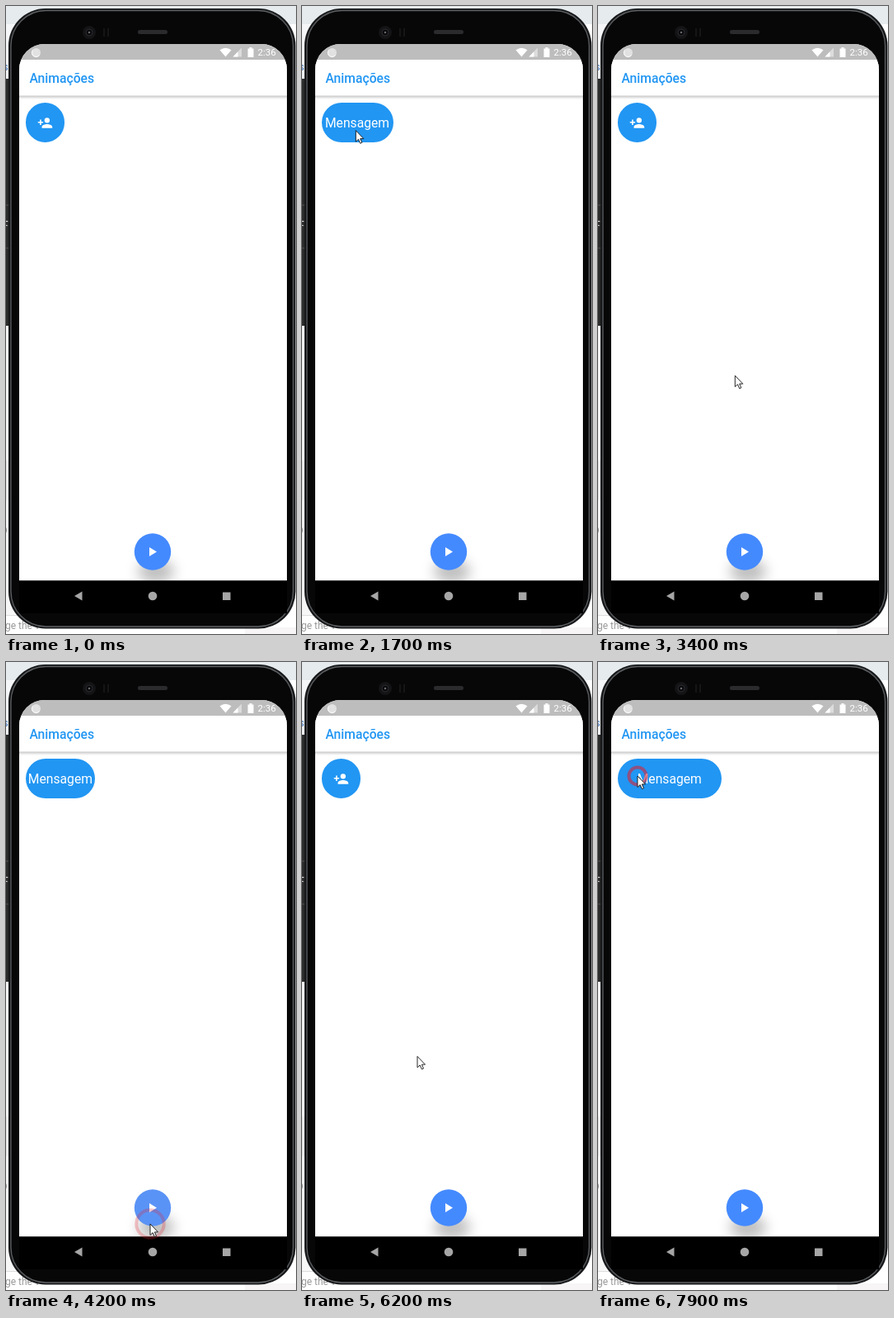
Write an HTML page that moves like this. It is 352x760 px and loops after 8 s.

```html
<!DOCTYPE html>
<html lang="pt">
<head>
<meta charset="utf-8">
<title>Animações</title>
<style>
html, body { margin: 0; width: 100%; height: 100%; overflow: hidden; background: #fff; }
#stage { position: relative; width: 352px; height: 760px; overflow: hidden; }
svg { position: absolute; left: 0; top: 0; }
text { font-family: Roboto, sans-serif; }
#button {
  position: absolute; left: 23.5px; top: 117px; height: 48px;
  border-radius: 24px; background: #2196f3; overflow: hidden;
  display: flex; align-items: center; justify-content: center;
}
#label { position: relative; top: .8px; font: 15.7px/18.5px Roboto, sans-serif; color: #fff; overflow-wrap: anywhere; }
#icon { left: 50%; top: 50%; margin: -9.5px 0 0 -9.5px; }
</style>
</head>
<body>
<div id="stage">
  <svg width="352" height="760">
    <defs>
      <filter id="soft" x="-50%" y="-80%" width="200%" height="260%"><feGaussianBlur stdDeviation="8"/></filter>
      <filter id="thin" x="-5%" y="-20%" width="110%" height="140%"><feGaussianBlur stdDeviation="1.5"/></filter>
      <clipPath id="screen"><path d="M16 695.5V77a31 31 0 0 1 31-31H310a31 31 0 0 1 31 31V695.5z"/></clipPath>
    </defs>

    <!-- page behind the phone -->
    <rect width="352" height="22" fill="#e6ebee"/>
    <rect y="22" width="8" height="66" fill="#f4f6f8"/>
    <text x="-4" y="78" font-size="13" fill="#3c6fb5">s</text>
    <rect y="88" width="10" height="299" fill="#2b2b2b"/>
    <path d="M0 241h8M0 293h8" stroke="#555"/>
    <text x="-5" y="271" font-size="14" fill="#ddd">F</text>
    <rect y="387" width="10" height="350" fill="#f7f7f7"/>
    <rect y="550" width="10" height="48" fill="#e9e9e9"/>
    <text x="-3" y="638" font-size="13" fill="#555">)</text>
    <path d="M0 737.5h20" stroke="#ddd"/>
    <text x="-1" y="754" font-size="12" fill="#999">ge the v</text>
    <rect x="290" y="752" width="62" height="8" fill="#f7f5f5"/>

    <!-- phone -->
    <rect x="3" y="3" width="348.5" height="750.5" rx="45" fill="#17181a"/>
    <rect x="6" y="5.500" width="342.5" height="745.500" rx="42.500" fill="#070708" stroke="#5c5f61" stroke-width="1.3"/>
    <circle cx="101" cy="32" r="8" fill="#141416"/>
    <circle cx="101" cy="32" r="4" fill="#08080a" stroke="#2b2d30"/>
    <circle cx="101" cy="32" r="1.3" fill="#666"/>
    <path d="M119 27v10M124 27v10" stroke="#151517" stroke-width="2"/>
    <rect x="160" y="29" width="36" height="5" rx="2.5" fill="#2b2b2d"/>

    <!-- screen -->
    <g clip-path="url(#screen)">
      <rect x="16" y="46" width="325" height="650" fill="#fff"/>
      <rect x="10" y="68" width="337" height="42.5" fill="#c4c4c4" filter="url(#thin)"/>
      <rect x="16" y="65" width="325" height="43.500" fill="#fff"/>
      <rect x="16" y="46" width="325" height="19" fill="#bdbdbd"/>
      <ellipse cx="182" cy="684" rx="22" ry="15" opacity=".25" filter="url(#soft)"/>
    </g>
    <rect x="16" y="695.5" width="325" height="39.500"/>
    <circle cx="36.5" cy="56.5" r="5.5" fill="#e2e2e2"/>
    <path d="M32.5 53.5a5 5 0 0 0 8 6" fill="none" stroke="#fff"/>
    <path d="M259.5 53.3q7-5 14 0l-7 8.2z" fill="#fff"/>
    <path d="M275.5 61.5l10.5-11v11z" fill="#dcdcdc"/>
    <path d="M275.5 61.5l6-6.3v6.3z" fill="#fff"/>
    <path d="M293.5 51.5h2v-1.5h3v1.5h2v10.5h-7z" fill="#fff"/>
    <text x="305.5" y="60.3" font-size="11.5" fill="#fff">2:36</text>
    <text x="28.5" y="93" font-size="15.7" font-weight="500" fill="#2196f3">Animações</text>
    <circle id="play" cx="178" cy="660.5" r="22.2"/>
    <path d="M174 655v11l9-5.5z" fill="#fff"/>
    <g fill="#a6a6a6">
      <path d="M83 714l9.500-5.500v11z"/>
      <circle cx="178" cy="714" r="5.3"/>
      <rect x="263" y="709.500" width="9.500" height="9.500"/>
    </g>
  </svg>

  <div id="button">
    <span id="label">Mensagem</span>
    <svg id="icon" width="19" height="19" viewBox="0 0 24 24" fill="#fff">
      <circle cx="15" cy="8" r="4"/>
      <path d="M6 10V7H4v3H1v2h3v3h2v-3h3v-2zM15 14c-2.700 0-8 1.300-8 4v2h16v-2c0-2.700-5.300-4-8-4z"/>
    </svg>
  </div>

  <svg width="352" height="760">
    <circle id="ring" fill="none" stroke="#e0202f"/>
    <path id="cursor" d="M0 0V13.500L3.200 10.600L5.400 15.600L7.500 14.700L5.400 9.900H9.500z" fill="#fff" stroke="#111" stroke-width=".9"/>
  </svg>
</div>

<script>
const $ = id => document.getElementById(id);
const clamp = v => Math.max(0, Math.min(1, v));
const LOOP = 8000, STEP = 100, MORPH = 280, RING = 300;

// pointer stops: time, x, y
const path = [
  [700, 18, 177], [1200, 56, 127], [1350, 60, 132], [1550, 60, 132],
  [2000, 76, 188], [2250, 76, 188], [2600, 70, 141], [2800, 70, 141],
  [3100, 104, 247], [3300, 146, 365], [3600, 207, 612], [3900, 175, 680],
  [4600, 175, 680], [5100, 133, 405], [5400, 62, 139], [5600, 62, 139],
  [6400, 166, 590], [6800, 191, 655], [7100, 191, 655], [7300, 99, 414],
  [7700, 48, 138], [8000, 48, 138]
];
const clicks = [1350, 2650, 3950, 5450, 6860, 7750];
// button changes: start, grows
const morphs = [[1560, 1], [2866, 0], [4068, 1], [5620, 0], [7016, 1]];

function pointer(t) {
  const i = path.findIndex(p => p[0] > t);
  const [t0, x0, y0] = path[i - 1], [t1, x1, y1] = path[i];
  const k = (t - t0) / (t1 - t0);
  return [x0 + (x1 - x0) * k, y0 + (y1 - y0) * k];
}

function drawButton(t) {
  const [start, grows] = morphs.filter(m => m[0] <= t).pop() || [-MORPH, 0];
  const k = clamp((t - start) / MORPH);
  const open = grows ? k : 1 - k;
  $('button').style.width = 47.5 + 79 * open + 'px';
  $('label').style.opacity = clamp(grows ? open * 4 : (open - 0.45) * 2.5);
  $('icon').style.opacity = clamp(1 - open * (grows ? 3 : 2));
}

function drawPointer(t) {
  const shown = t >= path[0][0];
  const [x, y] = shown ? pointer(t) : [0, 0];
  $('cursor').style.display = shown ? '' : 'none';
  $('cursor').setAttribute('transform', `translate(${x} ${y})`);

  const age = t - (clicks.filter(c => c <= t).pop() ?? -LOOP);
  const pressed = age < RING;
  const r = 1.2 + age * 0.062;
  const attrs = { cx: x, cy: y, r, 'stroke-width': Math.min(4, r),
    opacity: pressed ? clamp(1.06 - age / 310) : 0 };
  for (const name in attrs) $('ring').setAttribute(name, attrs[name]);
  $('play').style.fill = pressed && y > 600 ? '#5a93f6' : '#448aff';
}

function frame(now) {
  const t = Math.floor(now % LOOP / STEP) * STEP;
  drawButton(t);
  drawPointer(t);
  requestAnimationFrame(frame);
}
frame(0);
</script>
</body>
</html>
```
